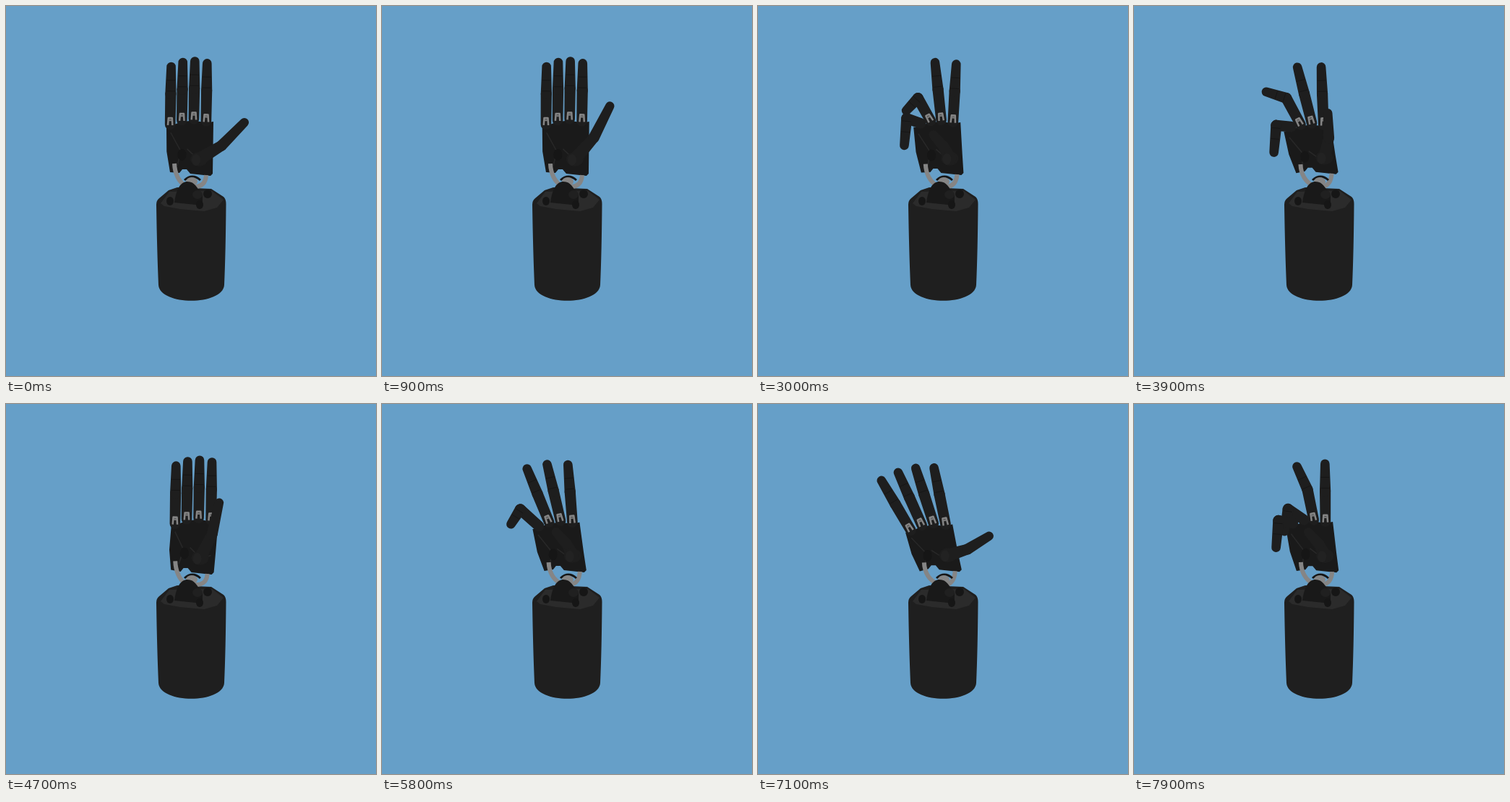
An HTML page with a canvas that plays this animation: 512 px wide and 512 px high, repeating every 8 s.

```html
<!DOCTYPE html>
<html lang="en">
<head>
<meta charset="utf-8">
<title>Robot hand</title>
<style>
html, body { margin: 0; width: 100%; height: 100%; overflow: hidden; background: #669fc8; }
canvas { display: block; width: 100vw; height: 100vh; }
</style>
</head>
<body>
<canvas id="c" width="512" height="512"></canvas>
<script>
const ctx = document.getElementById('c').getContext('2d');
const LOOP = 8000, STEP = 100;
const DARK = '#1e1e1e', DEEP = '#161616', EDGE = '#282828', METAL = '#858585';

// time, wrist lean, grip, thumb angle
const keys = [
  [0, 0, 0, 51],
  [450, -22, 0, 62],
  [1100, 6, 0, 25],
  [1800, -8, 3.4, -35],
  [2300, 5, 0, 19],
  [3000, -8, 1.35, -35],
  [3500, -22, 0, 65],
  [4200, -14, 1.65, -35],
  [4700, 8, 0, 19],
  [5250, -22, 0, 65],
  [5800, -16, 0.6, -35],
  [6300, -12, 1.65, -35],
  [7100, -21, 0, 65],
  [7900, -14, 1.65, -35]
];

const clamp = x => Math.min(1, Math.max(0, x));
const blend = (a, b, k) => a + (b - a) * k;

function stateAt(t) {
  const i = Math.max(1, keys.findIndex(k => k[0] >= t));
  const a = keys[i - 1], b = keys[i];
  const x = clamp((t - a[0]) / (b[0] - a[0])), k = x * x * (3 - 2 * x);
  return a.map((v, j) => blend(v, b[j], k)).slice(1);
}

function trace(points) {
  ctx.beginPath();
  points.forEach(p => ctx.lineTo(p[0], p[1]));
}

function poly(points, fill) {
  trace(points);
  ctx.closePath();
  ctx.fillStyle = fill;
  ctx.fill();
}

function line(points, width, color) {
  trace(points);
  ctx.lineWidth = width;
  ctx.lineJoin = 'round';
  ctx.strokeStyle = color;
  ctx.stroke();
}

function curve(a, b, c, width, color) {
  ctx.beginPath();
  ctx.moveTo(...a);
  ctx.quadraticCurveTo(...b, ...c);
  ctx.lineWidth = width;
  ctx.strokeStyle = color;
  ctx.stroke();
}

function ball(x, y, rx, ry, color) {
  ctx.beginPath();
  ctx.ellipse(x, y, rx, ry, 0, 0, 7);
  ctx.fillStyle = color;
  ctx.fill();
}

// limb with round ends that narrows from r to s
function taper(a, b, r, s) {
  const dir = Math.atan2(b[1] - a[1], b[0] - a[0]);
  ctx.beginPath();
  ctx.arc(a[0], a[1], r, dir + Math.PI / 2, dir - Math.PI / 2);
  ctx.arc(b[0], b[1], s, dir - Math.PI / 2, dir + Math.PI / 2);
  ctx.closePath();
  ctx.fillStyle = DARK;
  ctx.fill();
}

// point at a distance from p, in degrees from upright
function reach(p, deg, len) {
  const a = deg * Math.PI / 180;
  return [p[0] + Math.sin(a) * len, p[1] - Math.cos(a) * len];
}

function body() {
  ctx.beginPath();
  ctx.moveTo(208, 275);
  ctx.quadraticCurveTo(208, 269, 212, 266);
  ctx.lineTo(225, 255);
  ctx.lineTo(237, 251);
  ctx.lineTo(284, 253);
  ctx.lineTo(301, 264);
  ctx.quadraticCurveTo(304.5, 267, 304.5, 274);
  ctx.quadraticCurveTo(304, 340, 302, 386);
  ctx.bezierCurveTo(300, 415, 213, 415, 211, 386);
  ctx.quadraticCurveTo(209, 340, 208, 275);
  ctx.fillStyle = '#1f1f1f';
  ctx.fill();
  poly([[214, 273], [226, 257], [285, 256], [301, 268], [292, 279], [274, 284], [241, 281], [219, 277]], '#2b2b2b');
}

function mount() {
  ball(279, 260, 6, 6, DEEP);
  curve([247, 241], [258, 231], [269, 241], 3, DEEP);
  ball(257, 243, 8, 6, METAL);
  ctx.beginPath();
  ctx.moveTo(233, 272);
  ctx.bezierCurveTo(236, 252, 242, 243, 251, 243);
  ctx.bezierCurveTo(262, 243, 264, 252, 272, 262);
  ctx.lineTo(272, 276);
  ctx.fillStyle = '#191919';
  ctx.fill();
  ball(265, 261, 7, 6, '#202020');
  ball(227, 270, 5, 6, DEEP);
  ball(268, 275, 5, 6, DEEP);
}

function fork(base, angle) {
  ctx.save();
  ctx.translate(...base);
  ctx.rotate(angle * Math.PI / 180);
  line([[-3.2, 6], [-2.5, -4], [2.5, -4], [3.2, 6]], 2.5, METAL);
  line([[-2, -1], [2, -1]], 2.5, '#777');
  ctx.restore();
}

// the knuckle folds late, the tip folds early and foreshortens on the way
function finger(base, fan, curl) {
  const a1 = fan - 46 * curl * curl;
  const a2 = blend(fan, -175, Math.sin(curl * Math.PI / 2));
  const mid = reach(base, a1, 37.5 - 22 * curl * curl);
  const len = 37.5 - 14 * Math.sin(curl * Math.PI);
  const tip = reach(mid, a2, len);
  taper(reach(base, a1, -5), mid, 7.3, 7.6);
  taper(mid, tip, 7.6, 6.3);
  for (const d of [0.1, 0.5]) {
    const p = reach(mid, a2, len * d);
    line([reach(p, a2 + 90, -6), reach(p, a2 + 90, 6)], 1, DEEP);
  }
  if (curl < 0.6) fork(base, a1);
}

function thumb(root, angle) {
  const len = Math.max(40, 88 - 0.028 * (angle - 35) ** 2);
  const mid = reach(root, angle + 8, len * 0.45), tip = reach(root, angle, len);
  ball(...root, 12, 10, DARK);
  taper(root, mid, 9, 7.3);
  taper(mid, tip, 7.6, 6.2);
  ball(root[0] - 4, root[1] + 1, 6, 8, '#222');
}

function hand([lean, grip, thumbAngle]) {
  const curls = [0, 1, 2, 3].map(i => clamp(grip - i * 0.8));
  const lift = 8 * curls[3], dip = lean * lean;
  const tl = [222 + 0.85 * lean, 166 + 0.027 * dip - lift];
  const tr = [287 + 0.85 * lean, 160 + 0.015 * dip - lift];
  const br = [286 + 0.2 * lean, 235 + 0.13 * lean];
  const bl = [227 + 0.15 * lean, 230 - 0.07 * lean];
  const mix = (p, q, k) => [blend(p[0], q[0], k), blend(p[1], q[1], k)];
  const at = (u, v) => mix(mix(tl, tr, u), mix(bl, br, u), v);
  const slope = Math.atan2(tr[1] - tl[1], tr[0] - tl[0]) * 180 / Math.PI;
  const bases = curls.map((_, i) => reach(at(0.09 + 0.255 * i, 0), slope, i % 3 ? 11 : 6.5));

  poly([
    tl, ...bases.map(b => [b[0], b[1] + 7]), tr, at(1, 0.6), [br[0], br[1] - 3], [br[0] - 3, br[1]],
    [br[0] - 31, br[1] - 3], [br[0] - 36, br[1] - 9], [br[0] - 42, br[1] - 9], [br[0] - 46, br[1] - 4],
    bl, at(-0.04, 0.55)
  ], '#1a1a1a');
  line([at(0.08, 0.15), at(0.28, 0.55), at(0.18, 0.85)], 1.5, EDGE);
  line([at(0.42, 0.5), at(0.68, 0.72), at(0.9, 0.65)], 1.5, EDGE);
  ball(...at(0.3, 0.62), 6, 8, DEEP);

  for (let i = 3; i >= 0; i--) {
    const fan = 1 + Math.min(lean, 0) * (1.5 - 0.3 * i) + curls[0] * (i - 2) * 7;
    finger(bases[i], fan, curls[i]);
  }
  thumb([br[0] - 19, br[1] - 23], thumbAngle);

  curve([bl[0] + 6, bl[1] - 12], [bl[0] + 7, bl[1] + 9], [248, 249], 6, METAL);
  curve([br[0] - 9, br[1] - 1], [br[0] - 10, br[1] + 15], [261, 250], 6, METAL);
}

function draw(now) {
  const t = Math.floor((now % LOOP) / STEP) * STEP;
  ctx.fillStyle = '#669fc8';
  ctx.fillRect(0, 0, 512, 512);
  body();
  hand(stateAt(t));
  mount();
}

let start;
function tick(now) {
  start ??= now;
  draw(now - start);
  requestAnimationFrame(tick);
}
draw(0);
requestAnimationFrame(tick);
</script>
</body>
</html>
```
